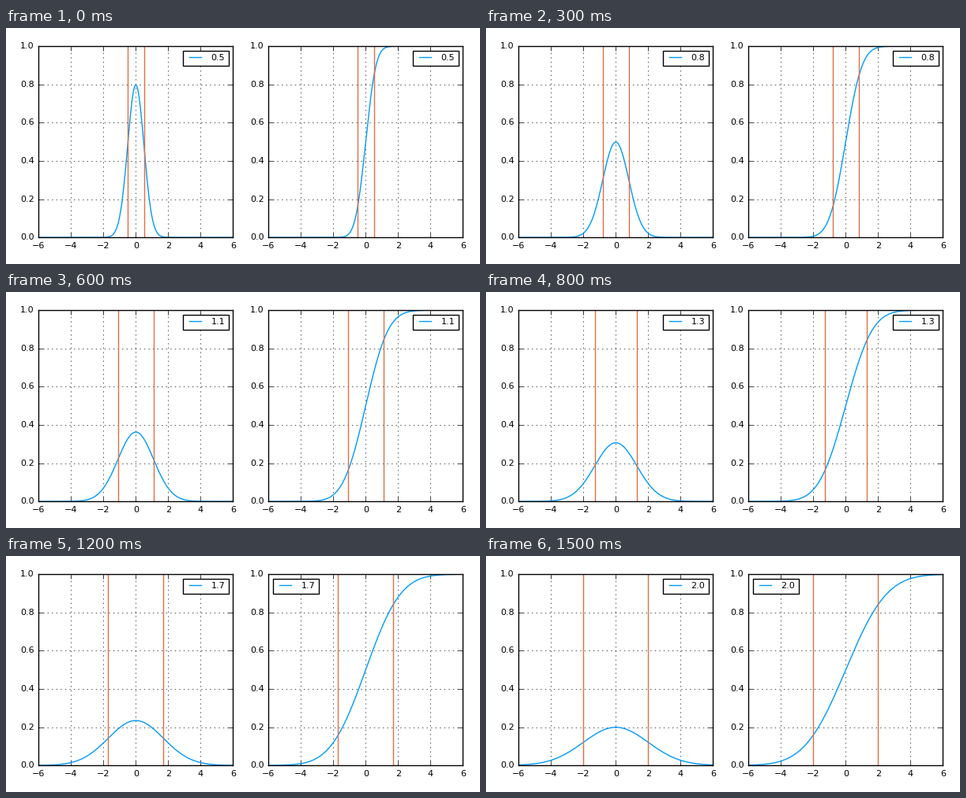
Recreate the animation shown at these times as a matplotlib script. Size 600 by 300 pixels, loop 1.6 s.

```python
import math

import matplotlib.pyplot as plt
import numpy as np
from matplotlib.animation import FuncAnimation
from matplotlib.ticker import MultipleLocator

WIDTH, HEIGHT, DPI = 600, 300, 100
FRAMES, INTERVAL = 16, 100
BLUE, ORANGE = "#009afa", "#e26f46"

plt.style.use("classic")
plt.rcParams.update({
    "font.family": "DejaVu Sans",
    "font.size": 8,
    "xtick.labelsize": 8,
    "ytick.labelsize": 8,
    "legend.fontsize": 8,
    "axes.axisbelow": True,
    "axes.grid": True,
    "figure.facecolor": "white",
    "savefig.dpi": "figure",
})

x = np.linspace(-6, 6, 241)
erf = np.vectorize(math.erf)


def pdf(sigma):
    return np.exp(-0.5 * (x / sigma) ** 2) / (sigma * math.sqrt(2 * math.pi))


def cdf(sigma):
    return 0.5 * (1 + erf(x / (sigma * math.sqrt(2))))


class Panel:
    def __init__(self, fig, left, func):
        # Plot area in pixels, measured from the bottom left
        self.ax = fig.add_axes(
            [left / WIDTH, 33.8 / HEIGHT, 246 / WIDTH, 243 / HEIGHT])
        self.func = func
        self.curve, = self.ax.plot(x, np.zeros_like(x), color=BLUE)
        self.bounds = [self.ax.axvline(0, color=ORANGE) for _ in range(2)]
        self.ax.set(xlim=(-6, 6), ylim=(0, 1))
        self.ax.xaxis.set_major_locator(MultipleLocator(2))
        self.ax.yaxis.set_major_locator(MultipleLocator(0.2))

    def show(self, sigma, legend_loc):
        self.curve.set_ydata(self.func(sigma))
        for line, pos in zip(self.bounds, (-sigma, sigma)):
            line.set_xdata([pos, pos])
        self.curve.set_label(f"{sigma:.1f}")
        self.ax.legend(handles=[self.curve], loc=legend_loc)


fig = plt.figure(figsize=(WIDTH / DPI, HEIGHT / DPI), dpi=DPI)
density = Panel(fig, 41.3, pdf)
cumulative = Panel(fig, 332.3, cdf)


def update(frame):
    sigma = (5 + frame) / 10
    density.show(sigma, "upper right")
    # The legend jumps aside once the curve would run into it
    cumulative.show(sigma, "upper left" if sigma >= 1.5 else "upper right")
    return []


anim = FuncAnimation(fig, update, frames=FRAMES, interval=INTERVAL,
                     repeat=True, repeat_delay=0, blit=False)

plt.show()
```
